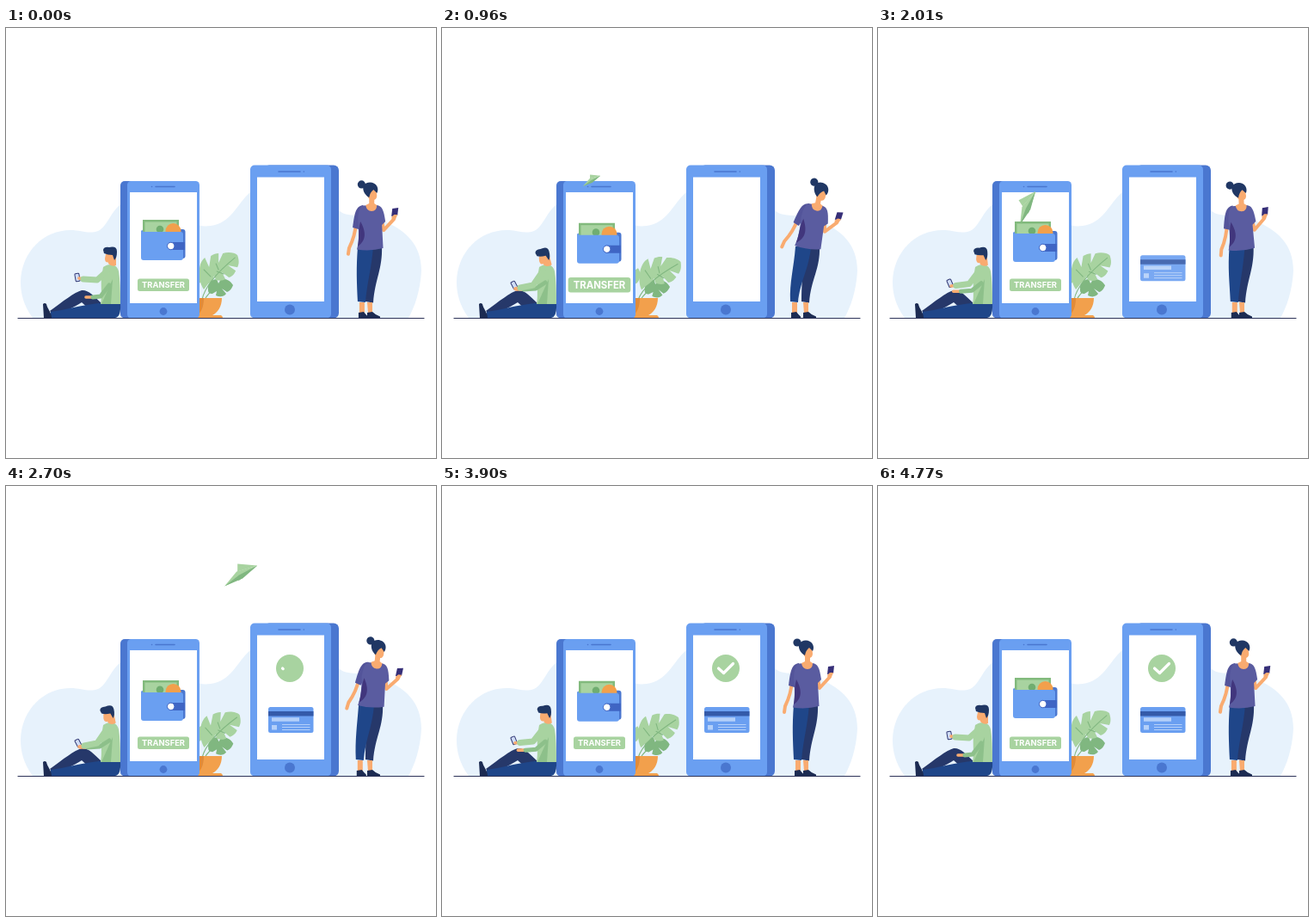
Animation of 500 by 500 pixels, one loop 4.83 s. Source, as an HTML page:

```html
<!DOCTYPE html>
<html lang="en">
<head>
<meta charset="utf-8">
<title>Money transfer</title>
<style>
  html, body { margin: 0; width: 100%; height: 100%; overflow: hidden; background: #fff; }
  svg { display: block; width: 100%; height: 100%; }
  text { font: 700 9.4px Inter, Roboto, sans-serif; fill: #fff; text-anchor: middle; }
  .blue { fill: #6a9ff1; }
  .deep { fill: #4a77d0; }
  .pale { fill: #b4d0f9; }
  .leaf { fill: #a8d3a0; }
  .moss { fill: #80b780; }
  .skin { fill: #f9ab70; }
  .navy { fill: #26386a; }
  .jean { fill: #1f4689; }
  .shoe { fill: #1c2b52; }
  .hair { fill: #203764; }
  .sky { fill: #e7f2fc; }
  .line { fill: none; stroke-linecap: round; stroke-linejoin: round; }
</style>
</head>
<body>
<svg viewBox="0 0 500 500">
  <path class="sky" d="M31 337C20 322 17 308 17 295C18 260 44 235 75 235C88 235 96 240 107 236C118 231 122 212 135 204C160 190 180 200 200 215C214 228 225 232 238 230C262 227 268 205 284 191C320 170 365 190 388 213C400 222 418 214 438 224C465 235 483 252 483 282C482 305 475 325 468 337Z"/>

  <g id="sideLeaf">
    <path class="leaf" d="M219 312C214 296 218 284 226 279C230 284 230 291 226 296L223 298C225 304 224 309 222 314Z"/>
  </g>
  <g id="smallLeaf">
    <path class="line" stroke="#80b780" stroke-width="1.2" d="M231 316Q235 308 243 303"/>
    <path class="moss" d="M235 305C234 297 239 292 245 292L247 297L250 292C256 291 261 294 264 299C262 304 260 306 257 307L251 303L256 309C253 313 248 313 244 311L245 306L240 309C237 309 235 308 235 305Z"/>
  </g>
  <g id="bigLeaf">
    <path class="leaf" d="M230 304C223 294 222 274 231 267L236 278L238 265C241 263 244 262 247 262L247 273L252 262C258 260 266 261 269 264C271 270 271 274 269 278L258 276L267 282C265 287 262 289 259 290L251 284L255 292C252 294 248 294 244 293L242 288L240 293C236 296 233 300 230 304Z"/>
    <path class="line" stroke="#80b780" stroke-width="1.1" d="M228 316Q232 295 266 267M238 289L230 281M247 281L244 274M245 283L253 286"/>
  </g>
  <path fill="#f2a04c" d="M221 314H251C251 324 246 331 240 334H250Q252 335 252 337H221Z"/>
  <path fill="#e18b39" d="M221 314H230C230 324 227 331 222 334Z"/>

  <rect class="deep" x="133" y="178" width="40" height="159.5" rx="5"/>
  <rect class="blue" x="141" y="178" width="84" height="159.5" rx="4.5"/>
  <path fill="#fff" d="M144 191H222V320H144Z"/>
  <circle class="deep" cx="183" cy="329.5" r="4.4"/>
  <path class="line" stroke="#4a77d0" stroke-width="1.6" d="M174 184.5H196M169.5 184.5h.1"/>

  <g id="plane">
    <path class="leaf" d="M19-10L-4-12L-4-3Z"/>
    <path class="moss" d="M19-10L-1 0L-3 8Z"/>
    <path class="leaf" d="M19-10L-5-3L-19 14L2 4Z"/>
    <path class="moss" d="M19-10L-2 1L-19 14L2 5Z"/>
  </g>

  <g id="wallet">
    <rect class="deep" x="158" y="234" width="50.5" height="34" rx="3"/>
    <path fill="#82ba7d" d="M159 223H201V246H159Z"/>
    <path fill="#a8d3a0" d="M161.500 225.500H198.500V246H161.500Z"/>
    <circle fill="#70ad70" cx="179" cy="234" r="4.300"/>
    <circle fill="#f2a04c" cx="194.500" cy="236" r="9"/>
    <path class="blue" d="M157 235Q158 237 161 237H203Q206 237 206 240V267Q206 270 203 270H160Q157 270 157 267Z"/>
    <path fill="#3f65c4" d="M192 249H208V258H192A4.500 4.500 0 0 1 192 249Z"/>
    <circle fill="#fff" stroke="#3f65c4" stroke-width="1" cx="191.700" cy="253.500" r="4.200"/>
  </g>

  <g id="button">
    <rect class="leaf" x="153" y="291.500" width="60" height="14.500" rx="2.500"/>
    <text x="183" y="302.200">TRANSFER</text>
  </g>

  <rect class="deep" x="300" y="159.500" width="87" height="178" rx="6"/>
  <rect class="blue" x="284" y="159.500" width="94" height="178" rx="5"/>
  <path fill="#fff" d="M292 173.500H370V318H292Z"/>
  <circle class="deep" cx="330" cy="327.500" r="6"/>
  <path class="line" stroke="#4a77d0" stroke-width="1.600" d="M317 167H342M346.300 167h.1"/>

  <g id="card">
    <rect class="blue" x="305" y="257" width="52.500" height="30" rx="2.500"/>
    <path fill="#345aa9" d="M305 262H357.500V267.500H305Z"/>
    <path class="pale" d="M309 269.200H341V273.700H309ZM309 278H315V283.500H309Z"/>
    <path stroke="#b4d0f9" stroke-width="1" d="M321 277.500H353.500M321 280.500H353.500M321 283.500H353.500"/>
  </g>
  <g id="badge"><circle class="leaf" cx="330" cy="212" r="16"/></g>
  <path id="tick" class="line" stroke="#fff" stroke-width="3.200" pathLength="1" stroke-dasharray="1 2" d="M321.500 212L327.500 217.500L338.500 206.500"/>

  <g id="man">
    <path class="navy" d="M112 321C102 311 95 304 88 305C80 307 66 318 51 329L56 334C68 330 80 324 88 319L98 328H112Z"/>
    <path class="jean" d="M133 320H108C88 322 68 328 52 330V337H127Q134 336 133 320Z"/>
    <path class="shoe" d="M43 321Q45 319 47 321C48 327 53 330 53 337H44Z"/>
    <path class="leaf" d="M113 278C120 273 129 274 131 283Q133 295 133 321H110C112 310 110 300 111 290Z"/>
    <path fill="#8dc08a" d="M124 292L111 321H122Z"/>
    <path id="restSkin" class="line" stroke="#f9ab70" stroke-width="3.600"/>
    <path id="restSleeve" class="line" stroke="#8dc08a" stroke-width="5"/>
    <g id="device">
      <rect x="-2.500" y="-4.500" width="5" height="9" rx="1" fill="#cfdcf7" stroke="#333a75" stroke-width="1"/>
    </g>
    <path id="armSkin" class="line" stroke="#f9ab70" stroke-width="3.600"/>
    <path id="armSleeve" class="line" stroke="#a8d3a0" stroke-width="7"/>
    <g id="manHead">
      <path class="skin" d="M116 263H128V276Q123 278 119 274V272.500Q115 273 115 268Z"/>
      <path class="hair" d="M113 258Q114 254 120 255Q129 253 129 260C129 265 128 268 126 270L124 264Q118 264 114 262Z"/>
    </g>
  </g>

  <path class="line" stroke="#2d3358" stroke-width="1.200" d="M14 337.500H486"/>

  <g id="woman">
    <path id="farLeg" class="navy"/>
    <path id="nearLeg" class="jean"/>
    <path class="skin" d="M420 319H426V332H421Z"/>
    <path class="shoe" d="M420 331L426 330Q430 334 435 335.500V337H420Z"/>
    <g id="nearFoot">
      <path class="skin" d="M411 319H417V332H411Z"/>
      <path class="shoe" d="M410 331L416 330Q419 334 421 335.500V337H410Z"/>
    </g>
    <g id="torso">
      <g id="looseArm">
        <path class="line" stroke="#f9ab70" stroke-width="4" d="M407 226Q406 242 399 256L398 263"/>
        <path fill="#53549a" d="M415 206C407 207 405 214 403 232L410 234L415 220Z"/>
      </g>
      <path class="line" stroke="#f9ab70" stroke-width="4" d="M437 224L439 235L451 222"/>
      <path fill="#362f78" d="M449 210L456 209L455 218L448 219Z"/>
      <path class="skin" d="M448 220L451 217L455 217L453 222L449 224Z"/>
      <path fill="#5a5ca0" d="M414 206.500L431 206C437 207 439 211 441 225L437 229L438.500 256Q423 260 408 257.500C411 246 410 236 409 224Q409 211 414 206.500Z"/>
      <path fill="#41367d" d="M412 225C418 236 420 246 409 254C411 244 409 236 412 225Z"/>
      <path class="skin" d="M418 206L422 204V196H428V204L431 206Q431 213 425 213Q419 213 418 206Z"/>
      <g id="womanHead">
        <path class="skin" d="M420 186H430L431 195Q431 200 426 200Q420 199 420 194Z"/>
        <path class="hair" d="M415 184C418 178 428 178 431 184Q433 188 431 192L427 188Q423 191 422 197C418 195 414 190 415 184Z"/>
        <circle class="hair" cx="413" cy="182" r="4.600"/>
      </g>
    </g>
  </g>
</svg>
<script>
const LOOP = 4830;
const part = {};
document.querySelectorAll('[id]').forEach(el => part[el.id] = el);

const lerp = (a, b, u) => a + (b - a) * u;
const smooth = u => u * u * (3 - 2 * u);
const set = (id, name, value) => part[id].setAttribute(name, value);
const move = (id, value) => set(id, 'transform', value);

// Index of the segment that holds t, kept inside the table.
function segment(keys, t) {
  let i = 0;
  while (i < keys.length - 2 && t >= keys[i + 1][0]) i++;
  const u = (t - keys[i][0]) / (keys[i + 1][0] - keys[i][0]);
  return [i, Math.min(1, Math.max(0, u))];
}

function eased(keys, t) {
  const [i, u] = segment(keys, t);
  return lerp(keys[i][1], keys[i + 1][1], smooth(u));
}

// Smooth curve through every key; c picks the column.
function curve(keys, t, c) {
  const [i, u] = segment(keys, t);
  const slope = n => {
    if (n === 0 || n === keys.length - 1) return 0;
    return (keys[n + 1][c] - keys[n - 1][c]) / (keys[n + 1][0] - keys[n - 1][0]);
  };
  const span = keys[i + 1][0] - keys[i][0], v = 1 - u;
  return lerp(keys[i][c], keys[i + 1][c], smooth(u))
    + span * u * v * (v * slope(i) - u * slope(i + 1));
}

// Polyline between two poses.
const limb = (a, b, u) => 'M' + a.map((n, i) => lerp(n, b[i], u)).join(' ');

const SWAY = [[0, .02], [960, 1], [2040, -.2], [3060, .85], [3900, 0], [4830, .02]];
const HAND = [[0, 0], [650, 1], [1450, 1], [2010, .75], [2600, 1], [3240, 1], [3900, .65], [4650, 0], [4830, 0]];
const NOD = [[0, 0], [800, 1], [1200, 1], [2010, .4], [2700, .8], [3240, .8], [3900, .5], [4650, 0], [4830, 0]];
const PRESS = [[720, 1], [930, 1.21], [990, 1.21], [1200, 1]];
const FADE = [[1650, 0], [2100, 1]];
const RISE = [[1650, 30], [2180, 0]];
const POP = [[2280, 0], [2500, 1.1], [2620, 1]];
const DRAW = [[2660, 0], [3000, 1]];
const GROW = [[840, 0], [1040, .8], [1800, .95], [2700, 1]];
// time, x, y, angle
const FLIGHT = [[840, 174, 178, 0], [1040, 174, 178, 0], [1800, 171, 215, -33], [2010, 173, 208, -33],
  [2180, 184, 184, -28], [2700, 273, 102.5, 0], [3240, 348, 159, 58], [3600, 362, 225, 75]];

function plants(t) {
  const a = 5 - 5.3 * Math.cos(2 * Math.PI * (t / 2415 - .93));
  move('bigLeaf', `rotate(${a} 228 316)`);
  move('smallLeaf', `rotate(${a * .35} 231 316)`);
  move('sideLeaf', `rotate(${a * .3} 222 316)`);
}

function screens(t) {
  move('wallet', `translate(0 ${2 - 2 * Math.cos(2 * Math.PI * t / 1610)})`);
  move('button', `translate(183 298.75) scale(${eased(PRESS, t)}) translate(-183 -298.75)`);
  move('card', `translate(0 ${eased(RISE, t)})`);
  set('card', 'opacity', eased(FADE, t));
  move('badge', `translate(330 212) scale(${eased(POP, t)}) translate(-330 -212)`);
  const drawn = eased(DRAW, t);
  set('tick', 'stroke-dashoffset', 1 - drawn);
  set('tick', 'opacity', drawn > 0 ? 1 : 0);
}

function plane(t) {
  const [x, y, a] = [1, 2, 3].map(c => curve(FLIGHT, t, c));
  move('plane', `translate(${x} ${y}) rotate(${a}) scale(${eased(GROW, t)})`);
  set('plane', 'visibility', t > 840 && t < 3600 ? 'visible' : 'hidden');
}

function man(t) {
  const h = eased(HAND, t);
  move('manHead', `rotate(${-15 * eased(NOD, t)} 125 277)`);
  set('armSleeve', 'd', limb([117, 283, 106, 293, 90, 292], [117, 283, 106, 299, 91, 302], h));
  set('armSkin', 'd', limb([90, 292, 85, 291], [91, 302, 85, 303], h));
  set('restSleeve', 'd', limb([120, 299, 110, 312, 101, 313], [120, 296, 109, 303, 95, 304], h));
  set('restSkin', 'd', limb([101, 313, 93, 313], [95, 304, 86, 304], h));
  move('device', `translate(${lerp(83, 84, h)} ${lerp(290, 299, h)}) rotate(${lerp(-10, -28, h)})`);
}

function woman(t) {
  const k = eased(SWAY, t);
  move('torso', `translate(${2 * k} ${-2 * k}) rotate(${11 * k} 421 257)`);
  move('womanHead', `rotate(${8 * k} 424 204)`);
  move('looseArm', `rotate(${5 * k} 410 212)`);
  const top = 409 + 2 * k, low = 410 - 4 * k;
  move('nearFoot', `translate(${-4 * k} 0)`);
  set('nearLeg', 'd', `M${top} 254H${top + 18}C${top + 16} 280 ${low + 10} 295 ${low + 8} 319L${low - 1} 318C${low - 2} 295 ${top - 2} 280 ${top} 254Z`);
  set('farLeg', 'd', `M${top + 9} 254H${top + 28}C${top + 29} 280 429 292 427 319.5L418 318C418 298 ${top + 9} 280 ${top + 9} 254Z`);
}

function frame() {
  const t = performance.now() % LOOP;
  [plants, screens, plane, man, woman].forEach(draw => draw(t));
  requestAnimationFrame(frame);
}
frame();
</script>
</body>
</html>
```
